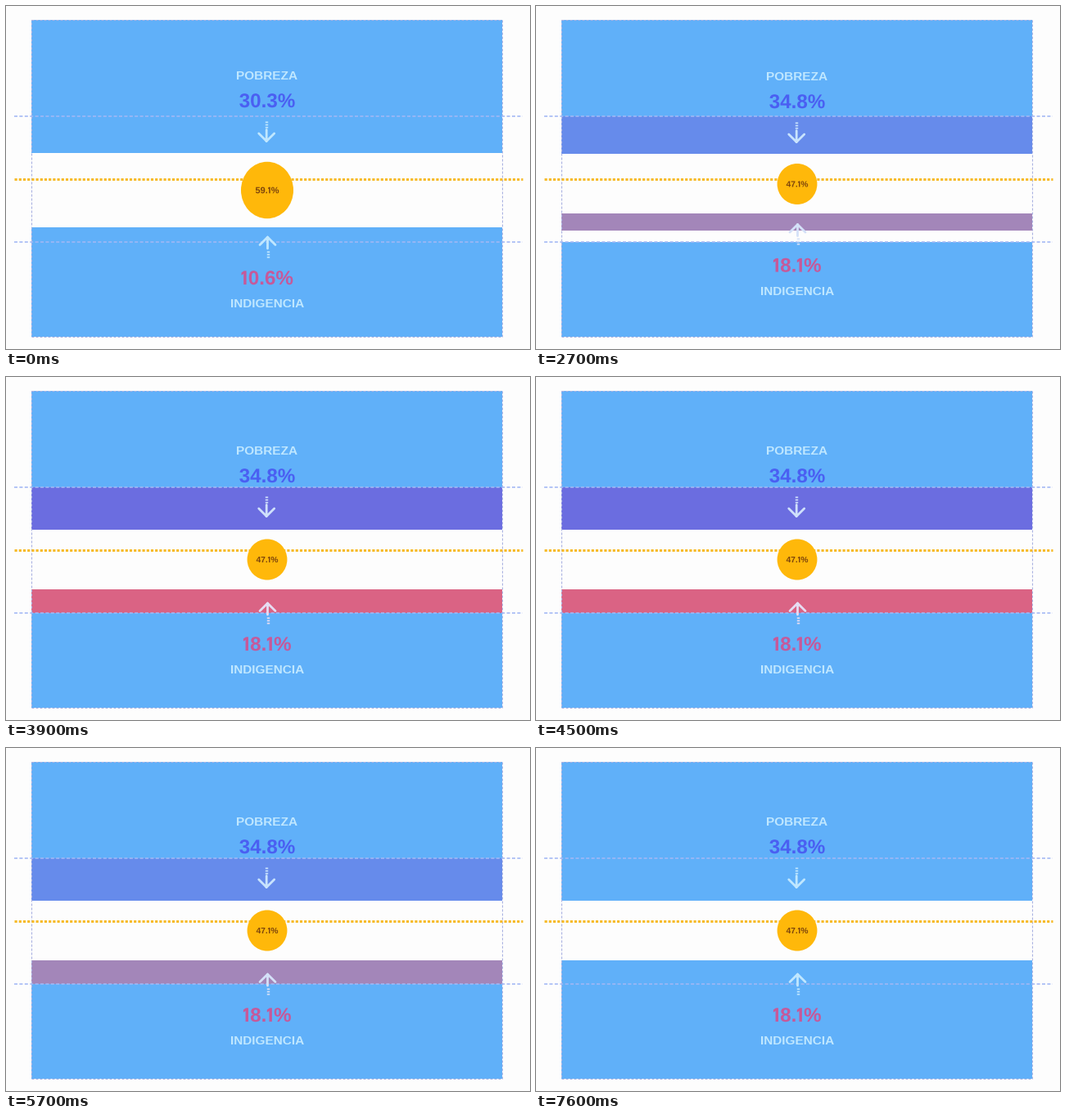
These frames come from a looping animation (640 by 420 pixels, 8 s). A matplotlib script:

```python
import matplotlib.pyplot as plt
import numpy as np
from matplotlib.animation import FuncAnimation
from matplotlib.colors import to_rgb
from matplotlib.patches import Ellipse, PathPatch, Rectangle
from matplotlib.path import Path
from matplotlib.textpath import TextPath
from matplotlib.transforms import Affine2D

W, H, DPI = 640, 420, 100
PT = 72 / DPI  # points per pixel
STEP, FRAMES = 100, 80

FONT = {"family": "Liberation Sans", "weight": "bold"}
BLUE, PURPLE, PINK = "#60b0f9", "#6b6de0", "#da6384"
YELLOW, PALE, DASH = "#ffb80a", "#bfe7ff", "#a2b8f5"

LEFT, RIGHT, TOP, BOTTOM = 31.3, 606, 16.7, 404.5
UPPER, MIDDLE, LOWER = 134.5, 211.5, 289.3
SWITCH = 2400  # moment the figures change

fig = plt.figure(figsize=(W / DPI, H / DPI), dpi=DPI, facecolor="#fdfdfd")
ax = fig.add_axes([0, 0, 1, 1])
ax.set(xlim=(0, W), ylim=(H, 0))
ax.axis("off")


def lerp(a, b, p):
    return a + (b - a) * p


def mix(a, b, p):
    return tuple(lerp(np.array(to_rgb(a)), np.array(to_rgb(b)), p))


def ramp(t, start, length):
    return min(max((t - start) / length, 0), 1)


def ease(u):
    return 4 * u**3 if u < 0.5 else 1 - 4 * (1 - u) ** 3


def number_path(text, size):
    """Centred figure with a narrow, footless one."""
    advance = {".": 0.278, "%": 0.889, "1": 0.36}
    one = Path([(0.27, 0), (0.13, 0), (0.13, 0.54), (0.02, 0.47),
                (0.02, 0.6), (0.15, 0.69), (0.27, 0.69), (0.27, 0)],
               closed=True)
    parts, x = [], 0
    for ch in text:
        if ch == "1":
            glyph = Affine2D().scale(size).transform_path(one)
        else:
            glyph = TextPath((0, 0), ch, size=size, prop=FONT)
        parts.append(Affine2D().translate(x, 0).transform_path(glyph))
        x += advance.get(ch, 0.556) * size
    flip = Affine2D().translate(-x / 2, -0.345 * size).scale(1, -1)
    return flip.transform_path(Path.make_compound_path(*parts))


def bar(y0, y1, color=BLUE):
    return ax.add_patch(Rectangle((LEFT, y0), RIGHT - LEFT, y1 - y0,
                                  fc=color, lw=0, zorder=1))


def dashed(xs, ys, color, width, on, off, z=3):
    ax.plot(xs, ys, color=color, lw=width * PT, zorder=z,
            ls=(0, (on / width, off / width)), dash_capstyle="butt")


def number(color, z=5):
    return ax.add_patch(PathPatch(Path([(0, 0)]), fc=color, lw=0, zorder=z))


def label(text, y):
    return ax.text(319, y, text, ha="center", va="baseline", color=PALE,
                   fontsize=15.4 * PT, family=FONT["family"],
                   weight="bold", zorder=5)


def arrow(direction):
    """Arrow with its tip at the origin and a dotted tail."""
    d = direction
    shaft = Path([(-9.5, -9.5 * d), (0, 0), (9.5, -9.5 * d),
                  (0, 0), (0, -14 * d)], [1, 2, 2, 1, 2])
    body = ax.add_patch(PathPatch(shaft, fc="none", lw=2.8 * PT, zorder=6,
                                  capstyle="round", joinstyle="round"))
    tail, = ax.plot([0, 0], [-24.5 * d, -16 * d], lw=3.4 * PT, zorder=6,
                    ls=(0, (1.7 / 3.4, 1.5 / 3.4)), dash_capstyle="butt")
    return body, tail


def move(artist, x, y):
    artist.set_transform(Affine2D().translate(x, y) + ax.transData)


bar(TOP, UPPER)
bar(LOWER, BOTTOM)
top_band, low_band = bar(UPPER, 180), bar(271, LOWER)

dashed([LEFT, RIGHT, RIGHT, LEFT, LEFT], [TOP, TOP, BOTTOM, BOTTOM, TOP],
       "#aab2e2", 1.1, 3, 2)
for y in (UPPER, LOWER):
    dashed([10, 631], [y, y], DASH, 1.6, 4, 2.4)
dashed([10, 631], [MIDDLE, MIDDLE], "#f7bb2a", 3, 3.2, 2)

disc = ax.add_patch(Ellipse((319, 226), 64, 69.5, fc=YELLOW, lw=0, zorder=4))
share = number("#7d450c")
poverty, destitution = number("#4a5ff2"), number("#c6599a")
top_label, low_label = label("POBREZA", 90.3), label("INDIGENCIA", 369.4)
down, up = arrow(1), arrow(-1)

BEFORE = [number_path(s, z) for s, z in
          (("30.3%", 24.2), ("59.1%", 11), ("10.6%", 24.2))]
AFTER = [number_path(s, z) for s, z in
         (("34.8%", 24.2), ("47.1%", 10.2), ("18.1%", 24.2))]


def draw(i):
    t = i * STEP
    changed = t >= SWITCH
    p = ease(ramp(t, SWITCH, 800))
    tint = ramp(t, SWITCH, 550) * (1 - ramp(t, 5450, 550))

    # Bands stack downward; the white one takes its new height at once.
    gap, size = (73, (48.8, 50)) if changed else (91, (64, 69.5))
    edge = lerp(180, 187, p)
    low = edge + gap
    low_height = lerp(LOWER - 271, LOWER - 260, p)
    top_shift = 5 * p
    low_shift = lerp(-18, -6, p) if changed else 0

    top_band.set_height(edge - UPPER)
    top_band.set_facecolor(mix(BLUE, PURPLE, tint))
    low_band.set_y(low)
    low_band.set_height(low_height)
    low_band.set_facecolor(mix(BLUE, PINK, tint))

    mid = (edge + low) / 2
    disc.set(center=(319, mid), width=size[0], height=size[1])

    places = (115.7 + top_shift, mid, 332.7 + low_shift)
    paths = AFTER if changed else BEFORE
    for art, path, y in zip((poverty, share, destitution), paths, places):
        art.set_path(path)
        move(art, 319, y)

    top_label.set_y(90.3 + top_shift)
    low_label.set_y(369.4 + low_shift)
    for parts, x, y, hue in ((down, 318.2, 165.5 + top_shift, "#cfe0fb"),
                             (up, 319.5, 283 + low_shift, "#e6dcf2")):
        color = mix(PALE, hue, tint)
        body, tail = parts
        body.set_edgecolor(color)
        tail.set_color(color)
        for part in parts:
            move(part, x, y)
    return []


anim = FuncAnimation(fig, draw, frames=FRAMES, interval=STEP,
                     repeat=True, repeat_delay=0)
plt.show()
```
